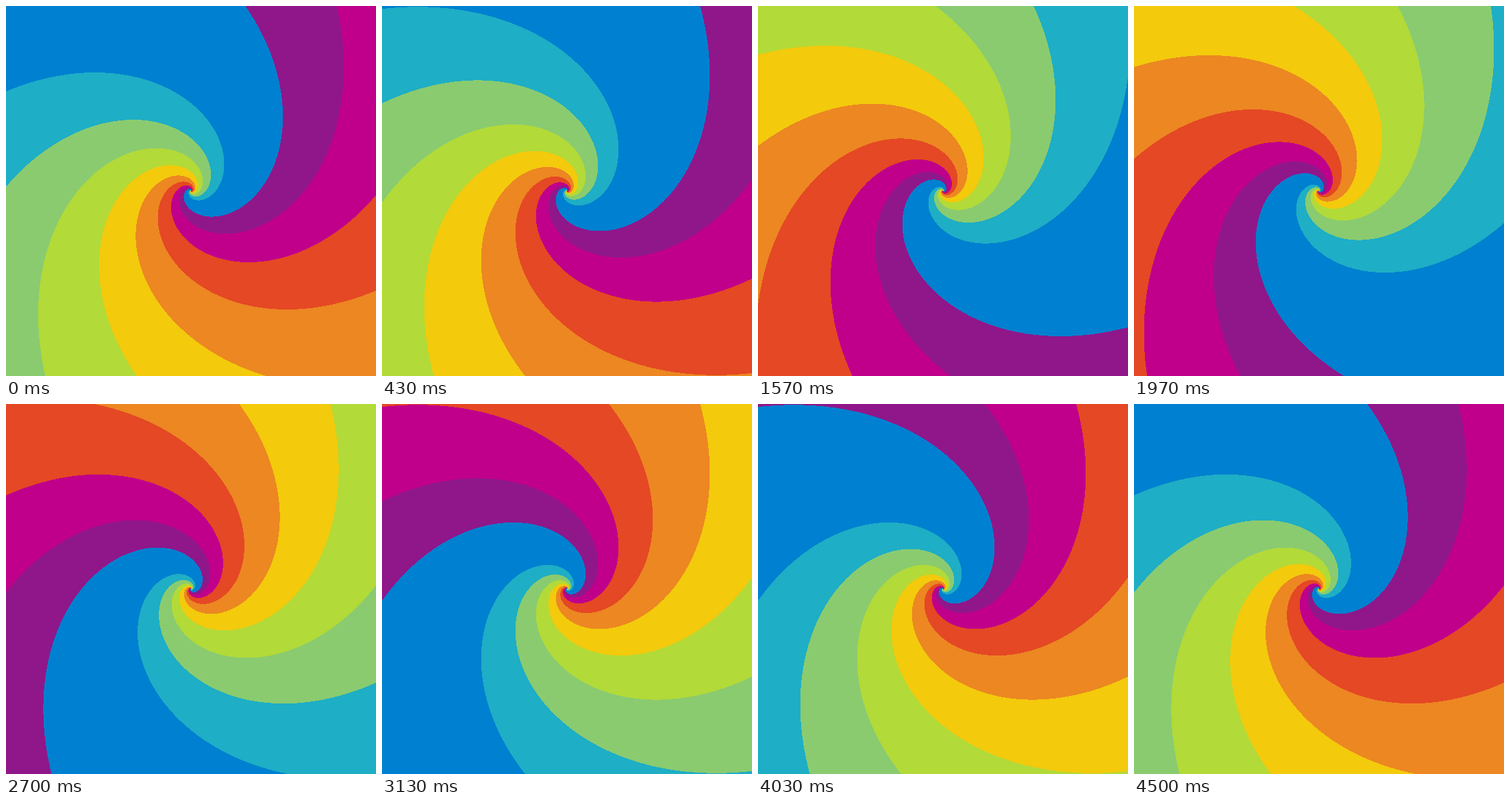
An HTML page with a canvas that plays this animation: 540 by 540 pixels, repeating every 4.53 s.

```html
<!DOCTYPE html>
<html lang="en">
<head>
<meta charset="utf-8">
<title>Rainbow spiral</title>
<style>
  html, body { margin: 0; height: 100%; overflow: hidden; }
  canvas { display: block; width: 540px; height: 540px; }
</style>
</head>
<body>
<canvas width="540" height="540"></canvas>
<script>
const SIZE = 540, LOOP = 4530, TICK = 30;
const SECTOR = 36, TURN_PER_TICK = 2.4;
const TWIST = 70.75;  // degrees of turn per unit of ln(radius)
const OFFSET = 35;    // angle of the first sector's edge

const colours = ['e54824', 'ec8722', 'f3ca0c', 'b2da38', '8acb70',
                 '1eaec5', '0080d0', '0080d0', '8f178a', 'c0008a'];
// Pixels are stored as ABGR.
const palette = colours.map(hex => {
  const [r, g, b] = hex.match(/../g).map(h => parseInt(h, 16));
  return (255 << 24 | b << 16 | g << 8 | r) >>> 0;
});

const ctx = document.querySelector('canvas').getContext('2d');
const image = ctx.createImageData(SIZE, SIZE);
const pixels = new Uint32Array(image.data.buffer);

// Angle of each pixel once the logarithmic spiral is unwound.
const unwound = Float32Array.from(pixels, (_, i) => {
  const x = i % SIZE + 0.5 - SIZE / 2;
  const y = Math.floor(i / SIZE) + 0.5 - SIZE / 2;
  return Math.atan2(y, x) * 180 / Math.PI + TWIST * Math.log(Math.hypot(x, y)) - OFFSET;
});

let shown = -1;

function draw() {
  const tick = Math.max(1, Math.floor(performance.now() % LOOP / TICK));
  if (tick !== shown) {
    shown = tick;
    const turn = tick * TURN_PER_TICK - 720;  // keeps the angles positive
    for (let i = 0; i < pixels.length; i++) {
      pixels[i] = palette[Math.floor((unwound[i] - turn) / SECTOR) % 10];
    }
    ctx.putImageData(image, 0, 0);
  }
  requestAnimationFrame(draw);
}
draw();
</script>
</body>
</html>
```
